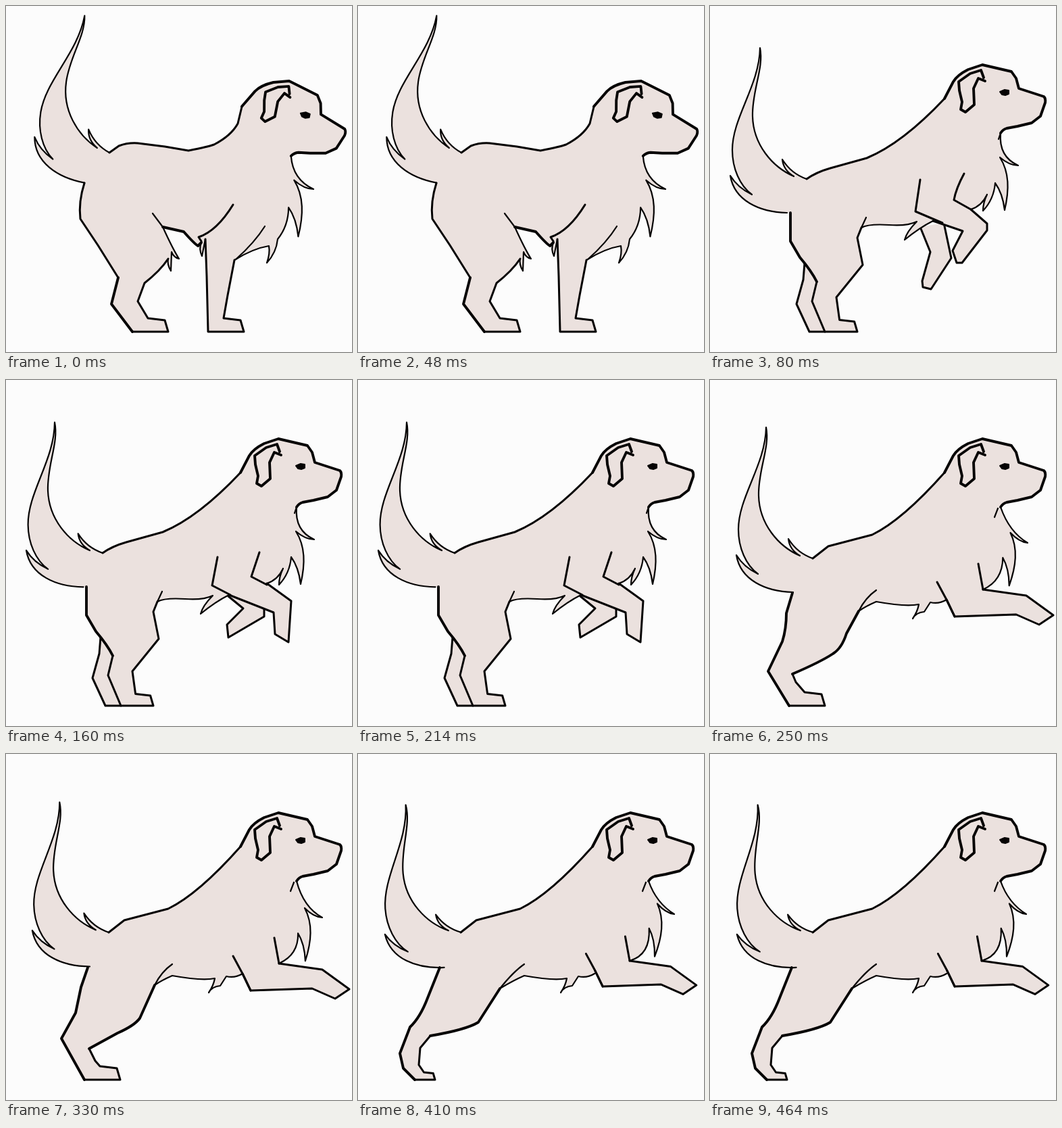
An HTML page with a canvas that plays this animation: 512x512 px, repeating every 0.5 s.

```html
<!DOCTYPE html>
<html lang="en">
<head>
<meta charset="utf-8">
<title>Dog leaping</title>
<style>
html, body { margin: 0; width: 100%; height: 100%; overflow: hidden; background: #fcfcfc; }
canvas { display: block; width: 100vmin; height: 100vmin; }
</style>
</head>
<body>
<canvas width="512" height="512"></canvas>
<script>
const ctx = document.querySelector('canvas').getContext('2d');
const FUR = '#ebe1de', INK = '#050303', PAPER = '#fcfcfc';
const THIN = 2.2, MID = 3, BOLD = 3.9;

// Body parts, each drawn around its own joint
const TAIL = `-29,50 C-70,49 -107,32 -113,-5 Q-102,13 -81,23 C-99,10 -110,-16 -110,-43
  C-110,-91 -70,-138 -69,-194 C-63,-164 -81,-131 -80,-93 C-79,-51 -51,-18 -19,-4
  C-29,-10 -35,-18 -36,-29 Q-23,-8 0,0`;
const HEAD = `-56,50 L-43,25 Q-37,15 -21,7 L0,0 43,10 50,20 54,35 91,47 Q94,50 93,56
  L86,76 73,86 52,91 36,94 Q30,96 27,101`;
const EAR = '4,24 L-6,20 -13,35 -12,59 -25,70 -32,66 -30,55 -34,38 -35,25 -18,13 -2,8 2,19';
const EYE = '26,40 L33,37 39,38 39,43 34,45 29,44 Z';
const NECK = '27,101';
const CHEST = 'Q-29,-13 0,0 Q-13,0 -27,-12 C-13,10 -13,36 -20,66 Q-23,41 -34,26';
const PAW = '-30,-20 L-5,-17 0,0 -53,0';
const REACH = '0,0 L64,9 104,38 83,52 49,37 -42,40 -54,15';

// Turn, scale and move every point of a path
function place(path, [x, y, deg = 0, size = 1]) {
  const c = Math.cos(deg * Math.PI / 180) * size;
  const s = Math.sin(deg * Math.PI / 180) * size;
  return path.replace(/(-?\d+),(-?\d+)/g, (_, u, v) =>
    `${(x + u * c - v * s).toFixed(1)},${(y + u * s + v * c).toFixed(1)}`);
}

const paw = (x, size = 1) => place(PAW, [x, 482, 0, size]);

// body: joined strokes from the nape round to the rump; far: limbs behind
function dog({ ms, tail, back, chest, bib, body, lines, far = [],
               head = [403, 87], ear = head }) {
  const neck = place(NECK, head);
  return {
    ms, far,
    outline: [
      [THIN, place(TAIL, tail)],
      [MID, back],
      [BOLD, place(HEAD, head)],
      [THIN, `${neck} ${place(CHEST, chest)} ${bib}`],
      ...body
    ],
    lines: [...lines, [BOLD, place(EAR, ear)]],
    eye: place(EYE, head)
  };
}

const crouch = () => dog({
  ms: 80,
  tail: [153, 217, 9.3],
  head: [419, 111, 13.5, 1.06],
  ear: [422, 112, 13.5, 0.95],
  chest: [455, 271, 1, 1.07],
  back: '153,217 L167,207 Q180,202 195,203 L235,208 270,214 Q300,208 308,205 Q333,192 343,174 L349,149',
  bib: 'Q418,325 402,345 Q400,365 386,380 Q391,366 389,355 Q365,359 338,376',
  body: [
    [MID, `338,376 L328,428 ${paw(352)} L297,400 295,345`],
    [THIN, '295,345 L290,370 Q285,360 289,350'],
    [BOLD, '289,350 L284,355 Q278,351 263,334 L232,327'],
    [THIN, '232,327 Q247,360 256,374 Q248,372 245,364 L244,392 Q238,382 240,374'],
    [MID, `240,374 Q228,392 205,410 L195,437 ${paw(240)}`],
    [BOLD, '187,482 L156,441 166,402'],
    [MID, '166,402 L136,354 110,315 Q107,290 116,262']
  ],
  lines: [
    [MID, '336,294 Q312,333 285,342 L289,348'],
    [THIN, '383,326 Q368,350 340,375'],
    [THIN, '217,307 L232,327']
  ]
});

const rear = (ms, turn, arm, farArm, creases) => dog({
  ms,
  tail: [143, 256, turn],
  chest: [456, 236],
  back: '143,256 Q157,246 178,240 L232,225 Q285,203 347,137',
  bib: 'Q420,286 404,303 Q404,291 410,279 Q402,296 386,301',
  body: [
    [MID, arm],
    [THIN, '330,318 Q310,328 288,346 Q291,334 306,319 Q292,326 265,324 Q235,322 224,328'],
    [MID, `224,328 L218,343 226,383 187,431 ${paw(218, 0.88)}`],
    [MID, '170,482 L151,437 158,408'],
    [BOLD, '158,408 Q150,392 133,372 L119,348 119,306']
  ],
  lines: [
    ...creases.map(path => [MID, path]),
    [THIN, '231,313 L224,328'],
    [THIN, '430,188 L427,197']
  ],
  far: [
    [MID, farArm],
    [MID, '140,380 L138,405 128,441 147,482 170,482 170,405']
  ]
});

const leap = (ms, tail, chest, arm, shin, foot, calf) => dog({
  ms, tail, chest,
  back: '152,264 L175,246 240,229 Q285,207 347,137',
  bib: `Q433,297 ${arm[0]},${arm[1]}`,
  body: [
    [MID, place(REACH, arm)],
    [THIN, `350,325 Q339,332 326,329 L317,343 Q305,344 300,353 Q307,343 309,332
      Q290,336 246,328 Q230,335 ${shin.split(' ')[0]}`],
    [BOLD, shin],
    [MID, foot],
    [BOLD, calf]
  ],
  lines: [
    [MID, place('-7,-38 L0,0', arm)],
    [MID, place('-68,-11 L-54,15 -42,40', arm)],
    [THIN, `246,311 Q230,322 ${shin.split(' ')[0]}`],
    [THIN, '426,190 L421,203']
  ]
});

const poses = [
  crouch(),
  rear(80, 0,
    '386,301 L410,322 410,332 373,380 365,380 359,362 374,333 330,318',
    '311,327 L326,364 314,407 315,416 327,419 357,373 346,321',
    ['376,248 Q364,270 361,287 L386,301', '311,257 L304,304 344,321']),
  rear(90, -0.6,
    '386,301 L422,327 418,388 398,376 396,344 330,318',
    '329,320 L351,338 327,362 329,381 382,350 382,336',
    ['375,255 L363,291 386,303', '313,262 L305,304 332,318']),
  leap(80, [152, 264], [470, 241, 6.5], [404, 310],
    '220,342 L202,375 Q195,397 182,405 Q164,417 122,435', `122,435 L127,447 ${paw(170)}`,
    '117,482 L86,431 107,387 Q113,368 113,345 L122,315'),
  leap(80, [152, 264, -1.1], [468, 242, 4.5], [404, 310],
    '220,342 L198,391 Q190,402 165,413 L123,436', `123,436 L132,454 ${paw(169)}`,
    '116,482 L82,421 103,383 111,345 121,316'),
  leap(90, [153, 264, -4], [468, 237, 8], [402, 306, 0, 0.95],
    '210,347 L178,397 Q160,408 107,417', `107,417 L92,435 90,460 ${paw(114, 0.55)}`,
    '84,482 L67,465 62,443 77,404 Q92,390 103,361 L121,316')
];

function fill(path, color) {
  ctx.fillStyle = color;
  ctx.fill(new Path2D('M' + path));
}

function stroke([width, path]) {
  ctx.lineWidth = width;
  ctx.stroke(new Path2D('M' + path));
}

function draw({ far, outline, lines, eye }) {
  ctx.fillStyle = PAPER;
  ctx.fillRect(0, 0, 512, 512);
  ctx.strokeStyle = INK;
  ctx.lineCap = ctx.lineJoin = 'round';
  for (const limb of far) {
    fill(limb[1], FUR);
    stroke(limb);
  }
  fill(outline.map(([, path]) => path).join(' L'), FUR);
  [...outline, ...lines, [2, eye]].forEach(stroke);
  fill(eye, INK);
}

const loop = poses.reduce((sum, pose) => sum + pose.ms, 0);

function poseAt(t) {
  for (const pose of poses) {
    if (t < pose.ms) return pose;
    t -= pose.ms;
  }
}

const start = performance.now();
function tick() {
  draw(poseAt((performance.now() - start) % loop));
  requestAnimationFrame(tick);
}
tick();
</script>
</body>
</html>
```
